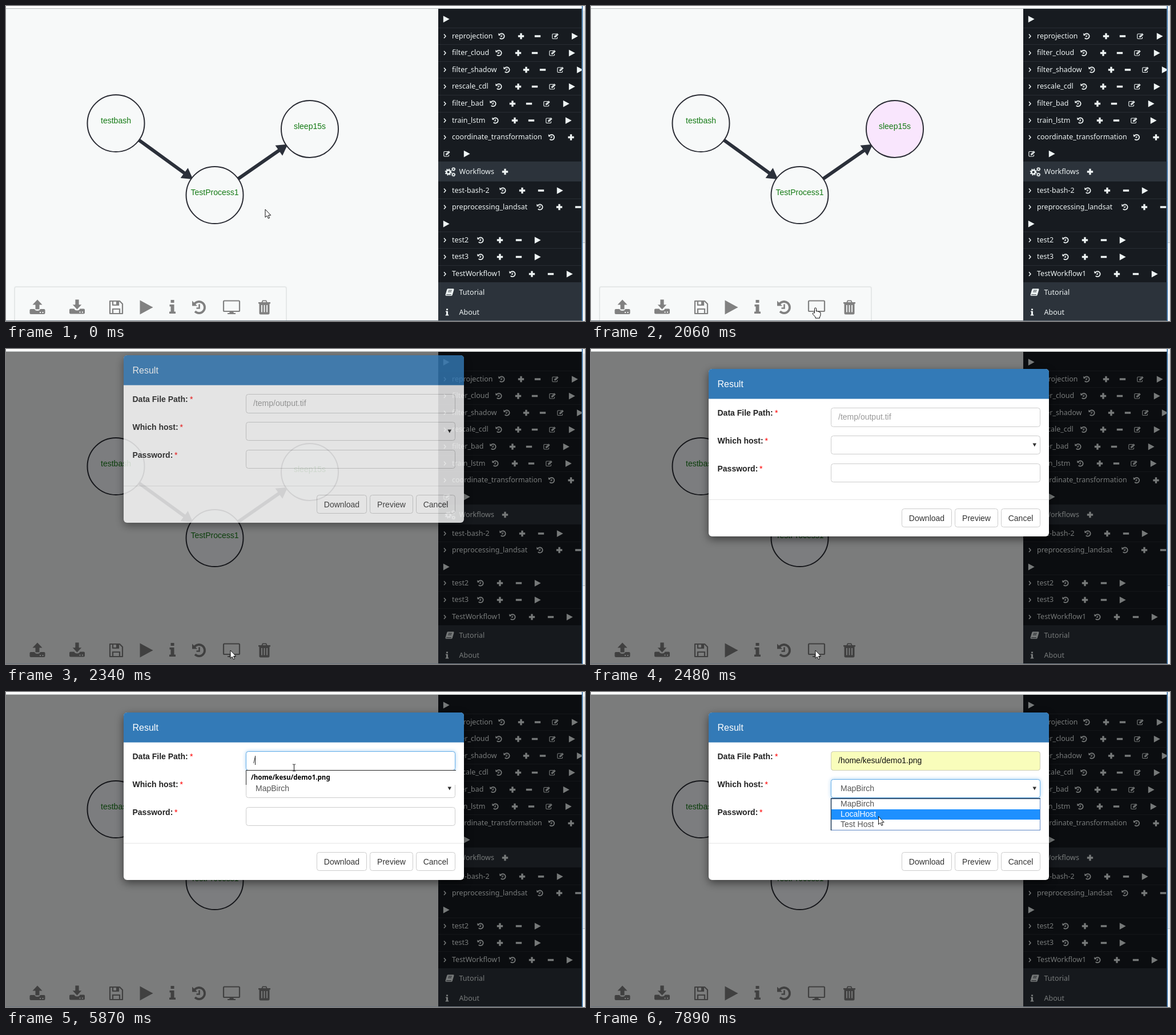
Write an HTML page that moves like this. It is 1014 px wide and 553 px high and loops after 8 s.

```html
<!DOCTYPE html>
<html lang="en">
<head>
<meta charset="utf-8">
<title>Workflow result dialog</title>
<style>
html, body { margin: 0; width: 100%; height: 100%; overflow: hidden; background: #f7f9f9; }
svg { display: block; width: 1014px; height: 553px; }
text { font: 14px "Liberation Sans", Arial, sans-serif; white-space: pre; }
.side text { font: 12.5px "Noto Sans", "Open Sans", sans-serif; fill: #eef4f4; }
.node text { fill: #147a14; text-anchor: middle; }
.label { font-weight: bold; fill: #222; }
.value { fill: #555; }
.btn { fill: #333; text-anchor: middle; }
.suggest { font: bold 11.5px "Noto Sans", "Open Sans", sans-serif; }
.line { fill: none; stroke: currentColor; }
</style>
</head>
<body>
<svg id="stage" viewBox="0 0 1014 553" xmlns="http://www.w3.org/2000/svg"></svg>
<script>
const LOOP = 8000;
const PATH = '/home/kesu/demo1.png';
const HOST = 'MapBirch';

// Icons are centred on 0,0 and about 24 units high.
const tray = '<path d="M-11.5 4H-5Q-4 7 0 7T5 4H11.5Q13.5 4 13.5 6V11Q13.5 13 11.5 13H-11.5Q-13.5 13-13.5 11V6Q-13.5 4-11.5 4ZM4 9V11H6V9ZM8.500 9V11H10.500V9Z" fill-rule="evenodd"/>';
const ring = (x, y, r) => `<circle class="line" cx="${x}" cy="${y}" r="${r}" stroke-width="${r * .75}"/>
  <circle class="line" cx="${x}" cy="${y}" r="${r * 1.55}" stroke-width="${r * .5}" stroke-dasharray="${r * .62} ${r * .597}"/>`;
const ICONS = {
  play: '<path d="M-11-12.500L12 0L-11 12.500Z"/>',
  plus: '<path d="M-3.500-11H3.500V-3.500H11V3.500H3.500V11H-3.500V3.500H-11V-3.500H-3.500Z"/>',
  minus: '<path d="M-11-3.500H11V3.500H-11Z"/>',
  history: '<path class="line" d="M-8-6A10 10 0 1 1-7 7.200" stroke-width="3.800"/><path d="M-12-11.500V-2.500H-3Z"/><path class="line" d="M.500-5.500V1.500H-4.500" stroke-width="2.600"/>',
  edit: '<path class="line" d="M4-8.500H-8.500Q-11-8.500-11-6V7Q-11 9.500-8.500 9.500H5Q7.500 9.500 7.500 7V3" stroke-width="2.400"/><path d="M-4 5V0L7-11L12-6L1 5Z"/><path d="M-1.500 1L7.500-8" class="line" style="stroke:#171b20" stroke-width="1.200"/>',
  upload: tray + '<path d="M0-12.500L8.500-3.500H3.500V4.500H-3.500V-3.500H-8.500Z"/>',
  download: tray + '<path d="M0 5.500L8.500-3.500H3.500V-12.500H-3.500V-3.500H-8.500Z" stroke="#f7f9f9" stroke-width=".8"/>',
  save: '<path class="line" d="M-11-11H6L11-6V11H-11Z" stroke-width="2.200" stroke-linejoin="round"/><path class="line" d="M-6 11V3H6V11M-6-11V-4H4V-11" stroke-width="2.200"/><path d="M0-10H3V-5H0Z"/>',
  info: '<path d="M-3-12H3V-7H-3ZM-5-4H3V8.500H5.500V12H-5.500V8.500H-3V-.500H-5Z"/>',
  desktop: '<rect class="line" x="-14" y="-11" width="28" height="18.500" rx="1.500" stroke-width="2.200"/><path d="M-3 8H3L4 10.500H7V12.500H-7V10.500H-4Z"/>',
  trash: '<path d="M-10.500-9H-5L-3.500-12.500H3.500L5-9H10.500V-6.500H9V10Q9 12.500 6.500 12.500H-6.500Q-9 12.500-9 10V-6.500H-10.500ZM-3-9H3L2.200-10.700H-2.200ZM-5.500-4V8.500H-3.700V-4ZM-.900-4V8.500H.900V-4ZM3.700-4V8.500H5.500V-4Z" fill-rule="evenodd"/>',
  book: '<path d="M-6-12H12Q15-12 14-8L9 9Q8 12 5 12H-11Q-15 12-14 8L-9-9Q-8-12-6-12ZM-4-7L-4.500-5H7L7.500-7ZM-5.500-2.500L-6 -.500H5.500L6-2.500ZM-11 7V9H5L6 7Z" fill-rule="evenodd"/>',
  cogs: ring(-5, 1, 6) + ring(11, -8, 3.600) + ring(11, 9, 3.600)
};
const icon = (name, x, y, scale = .47) =>
  `<g transform="translate(${x} ${y}) scale(${scale})">${ICONS[name]}</g>`;
const text = (s, x, y, cls = '') => `<text class="${cls}" x="${x}" y="${y}">${s}</text>`;
const box = (x, y, w, h, fill, extra = '') =>
  `<rect x="${x}" y="${y}" width="${w}" height="${h}" fill="${fill}" ${extra}/>`;
const field = (x, y, w, h, id = '') =>
  box(x + .5, y + .5, w - 1, h - 1, '#fff', `rx="4" stroke="#ccc" ${id && `id="${id}"`}`);

function node(label, x, y, id) {
  return `<g class="node"><circle id="${id}" cx="${x}" cy="${y}" r="50" fill="#f7f9f9" stroke="#2a2c34" stroke-width="2"/>${text(label, x, y)}</g>`;
}

function edge(x1, y1, x2, y2) {
  const d = Math.hypot(x2 - x1, y2 - y1), angle = Math.atan2(y2 - y1, x2 - x1) * 180 / Math.PI;
  return `<g transform="translate(${x1} ${y1}) rotate(${angle})" fill="#2b303a">
    <path d="M49-3H${d - 66}V-11L${d - 47} 0L${d - 66} 11V3H49Z"/></g>`;
}

function toolbar() {
  const items = [['upload', 55, 528], ['download', 124.5, 527.5], ['save', 193, 529], ['play', 245.5, 529],
    ['info', 291.5, 528], ['history', 338, 529], ['desktop', 395, 528.5], ['trash', 452.5, 529]];
  return box(15, 493, 476, 80, 'none', 'id="frame" rx="3" stroke="#e5e8e8" stroke-width="2"') +
    `<g fill="#818181" color="#818181">${items.map(([n, x, y]) => icon(n, x, y, 1)).join('')}</g>`;
}

function sidebar() {
  const process = [['history', 0], ['plus', 34], ['minus', 63], ['edit', 94], ['play', 128]];
  const flow = [['history', 0], ['plus', 34], ['minus', 67], ['play', 100]];
  const row = (name, y, x, set) => text(name, 781, y + 4) +
    `<path class="line" d="M767 ${y - 3}l3 3.500-3 3.500" stroke-width="1.500"/>` +
    set.map(([n, dx]) => icon(n, x + dx, y + .5)).join('');
  const rows = [
    ['reprojection', 52.5, 868, process], ['filter_cloud', 82, 863, process],
    ['filter_shadow', 111.5, 877, process], ['rescale_cdl', 141, 863, process],
    ['filter_bad', 171, 853, process], ['train_lstm', 200.5, 857, process],
    ['coordinate_transformation', 230, 955.5, process.slice(0, 2)],
    ['test-bash-2', 323.5, 870, flow], ['preprocessing_landsat', 352.5, 935, flow.slice(0, 3)],
    ['test2', 410.5, 831, flow], ['test3', 440, 831, flow], ['TestWorkflow1', 470, 887, flow]];
  const rules = [38, 67, 97, 126, 156, 186, 215, 338, 396, 425, 455];
  return `<g class="side" clip-path="url(#sideClip)" fill="#eef4f4" color="#eef4f4">` +
    box(757, 5, 252, 548, '#171b20') + box(757, 273, 252, 35, '#2c333b') + box(757, 485, 252, 68, '#2c333b') +
    rules.map(y => box(757, y, 252, 1, '#282d33')).join('') +
    rows.map(r => row(...r)).join('') +
    icon('play', 771, 23) + icon('edit', 772, 259.5) + icon('play', 807, 259.5) + icon('play', 771, 382.5) +
    icon('cogs', 777.5, 291, .56) + text('Workflows', 793.5, 295) + icon('plus', 874, 291) +
    icon('book', 777, 502.5, .53) + text('Tutorial', 793.5, 507) +
    icon('info', 772.5, 537.5, .5) + text('About', 793.5, 542) + '</g>';
}

function dialog() {
  const label = (s, y, starX) => text(s, 221.5, y, 'label') + `<text x="${starX}" y="${y}" fill="#f00">*</text>`;
  const button = (s, x, w) => field(x, 281, w, 33) + text(s, x + w / 2, 302.5, 'btn');
  const glow = (id, y, h) => `<g id="${id}">` +
    box(420, y, 367, h, '#66afe9', 'rx="4" filter="url(#glow)" opacity=".6"') +
    box(420.5, y + .5, 366, h - 1, '#fff', 'rx="4" stroke="#66afe9"') + '</g>';
  return '<g id="dialog">' +
    box(206, 36, 596, 294, '#000', 'rx="6" filter="url(#shadow)" opacity=".5" transform="translate(0 5)"') +
    box(206, 36, 596, 294, '#fff', 'rx="6"') +
    '<path d="M206 88.500V42Q206 36 212 36H796Q802 36 802 42V88.500Z" fill="#337ab7"/>' +
    '<text x="221.500" y="67.500" fill="#fff" style="font-size:16px">Result</text>' +
    label('Data File Path:', 118, 322) + label('Which host:', 167, 304.5) + label('Password:', 216, 295) +
    field(420, 104, 367, 34) + field(420, 153, 367, 33) + field(420, 202, 367, 33) +
    glow('pathFocus', 104, 34) + glow('hostFocus', 153, 33) +
    box(420.5, 104.5, 366, 33, '#f9fdbb', 'id="filled" rx="4" stroke="#cdcdb8"') +
    '<text id="path" x="433" y="125"></text>' + box(436, 112, 1, 16, '#222', 'id="caret"') +
    text(HOST, 437, 174, 'value').replace('<text', '<text id="host"') +
    '<path d="M773.500 166.500H780L776.800 172.500Z" fill="#333"/>' +
    box(206, 265, 596, 1, '#e5e5e5') +
    button('Download', 544, 88) + button('Preview', 637, 76) + button('Cancel', 718, 69) +
    `<g id="popup">${box(420, 137, 368, 26, '#fff', 'id="popupRow"')}
      <path d="M420.500 163V137.500H788" fill="none" stroke="#222"/>${text(PATH, 429, 154, 'suggest')}</g>` +
    `<g id="list">${box(420.5, 187.5, 366, 55, '#fff', 'stroke="#5f86c4"')}
      <path d="M420.500 243V187H787" fill="none" stroke="#1d3a58" stroke-width="1.500"/>
      ${box(421, 206, 365, 18, '#1e90ff', 'id="mark"')}
      ${[HOST, 'LocalHost', 'Test Host'].map((s, i) => text(s, 437, 201 + 18 * i, 'value option')).join('')}</g></g>`;
}

const cursors = `<g fill="#fff" stroke="#111" stroke-linejoin="round">
  <path id="arrow" d="M0 0V14L3.200 11.200L5.400 16L7.500 15L5.400 10.300H9.700Z"/>
  <path id="hand" d="M-1.500 9V1.200Q-1.500 0 0 0T1.500 1.200V6Q3.500 5 4.500 6.600Q6.200 6 7 7.400Q9 7 9 9V12Q9 14 7.500 16V18H0V16L-4.500 11Q-5.500 9-3.500 8.700Z"/>
  <path id="beam" d="M-2.500-6H-.700L0-5.500L.700-6H2.500M0-5.500V5.500M-2.500 6H-.700L0 5.500L.700 6H2.500" fill="none"/></g>`;

const stage = document.getElementById('stage');
stage.innerHTML = `<defs>
  <clipPath id="sideClip"><rect x="757" y="5" width="251.500" height="547.500"/></clipPath>
  <filter id="shadow" x="-10%" y="-20%" width="120%" height="140%"><feGaussianBlur stdDeviation="7.500"/></filter>
  <filter id="glow" x="-5%" y="-40%" width="110%" height="180%"><feGaussianBlur stdDeviation="3"/></filter></defs>` +
  box(0, 0, 1014, 553, '#f7f9f9') + box(0, 0, 1014, 4, '#fff') + box(0, 4, 1009, 1, '#b4b8b8') +
  edge(192.5, 206, 365.5, 332) + edge(365.5, 332, 532, 216) +
  node('testbash', 192.5, 206, 'nodeA') + node('TestProcess1', 365.5, 332, 'nodeB') + node('sleep15s', 532, 216, 'nodeC') +
  toolbar() + sidebar() + box(0, 5, 1009, 547, '#000', 'id="shade"') +
  box(0, 552, 1009, 1, '#6d7780') + box(1008.5, 0, 1.5, 553, '#2b6aa8') + box(1010, 0, 4, 553, '#eff1f3') +
  box(1010, 8, 4, 408, '#e0e3e6') + box(1010, 415, 4, 1, '#b9bec3') +
  dialog() + cursors;

const $ = id => document.getElementById(id);
const show = (id, on) => $(id).style.display = on ? '' : 'none';
const options = [...stage.querySelectorAll('.option')];

// Pointer samples: time, x, y and, when it changes, the shape.
const TRACK = [
  [0, 454, 357, 'arrow'], [130, 442, 388], [290, 407, 476], [450, 391, 514], [610, 426, 445],
  [770, 489, 310], [930, 522, 228], [1090, 508, 262], [1240, 455, 410], [1380, 402, 508],
  [1510, 393, 530, 'hand'], [2210, 393, 529, 'arrow'],
  [2900, 396, 512], [3050, 413, 440], [3190, 445, 345], [3340, 479, 262], [3480, 500, 210],
  [3630, 507.5, 187], [3770, 506, 160], [3910, 504.5, 122, 'beam'], [4060, 504.5, 133],
  [6000, 506, 144, 'arrow'], [6140, 508, 150], [6420, 513, 160], [6560, 518, 171], [6690, 520, 181],
  [6830, 521, 187], [6950, 521, 182], [7080, 521, 178],
  [7480, 517, 188], [7620, 511, 203], [7750, 506, 214], [7890, 503.5, 218.5]
];

function movePointer(t) {
  let shape, x, y;
  for (const [at, px, py, kind] of TRACK) {
    if (at > t) break;
    [x, y, shape] = [px, py, kind || shape];
  }
  for (const id of ['arrow', 'hand', 'beam']) show(id, id === shape);
  $(shape).setAttribute('transform', `translate(${x} ${y})`);
  return y;
}

function render(t) {
  const pointerY = movePointer(t);
  const dim = t >= 2210, open = t >= 2340;
  $('shade').setAttribute('opacity', open ? .5 : dim ? .45 : 0);
  show('frame', !dim);
  const plain = open ? '#f9fcff' : '#f7f9f9';
  $('nodeA').setAttribute('fill', plain);
  $('nodeB').setAttribute('fill', plain);
  $('nodeC').setAttribute('fill', t >= 930 && !dim ? '#f9e6fd' : plain);

  show('dialog', open);
  const step = t < 2480 ? 2340 : t < 2620 ? 2480 : 2620;
  const left = Math.max(0, 1 - (step - 2215) / 300);
  $('dialog').setAttribute('transform', `translate(0 ${-Math.round(73 * left * left)})`);
  $('dialog').setAttribute('opacity', step === 2340 ? .8 : 1);

  const chosen = t >= 6000, typed = t >= 4640;
  $('path').textContent = chosen ? PATH : typed ? '/' : '/temp/output.tif';
  $('path').setAttribute('fill', chosen ? '#111' : typed ? '#555' : '#999');
  show('filled', chosen);
  show('pathFocus', t >= 4060 && t < 7350);
  show('caret', t >= 4760 && t < 5320 || t >= 5870 && !chosen);
  show('popup', t >= 4220 && t < 6280);
  $('popupRow').setAttribute('fill', chosen ? '#e4e4e4' : '#fff');

  show('host', t >= 2760);
  show('hostFocus', t >= 7350);
  show('list', t >= 7350);
  const pick = pointerY >= 206 ? 1 : 0;
  $('mark').setAttribute('y', 188 + 18 * pick);
  options.forEach((o, i) => o.style.fill = i === pick ? '#fff' : '');
}

const start = performance.now();
function tick() {
  render((performance.now() - start) % LOOP);
  requestAnimationFrame(tick);
}
tick();
</script>
</body>
</html>
```
